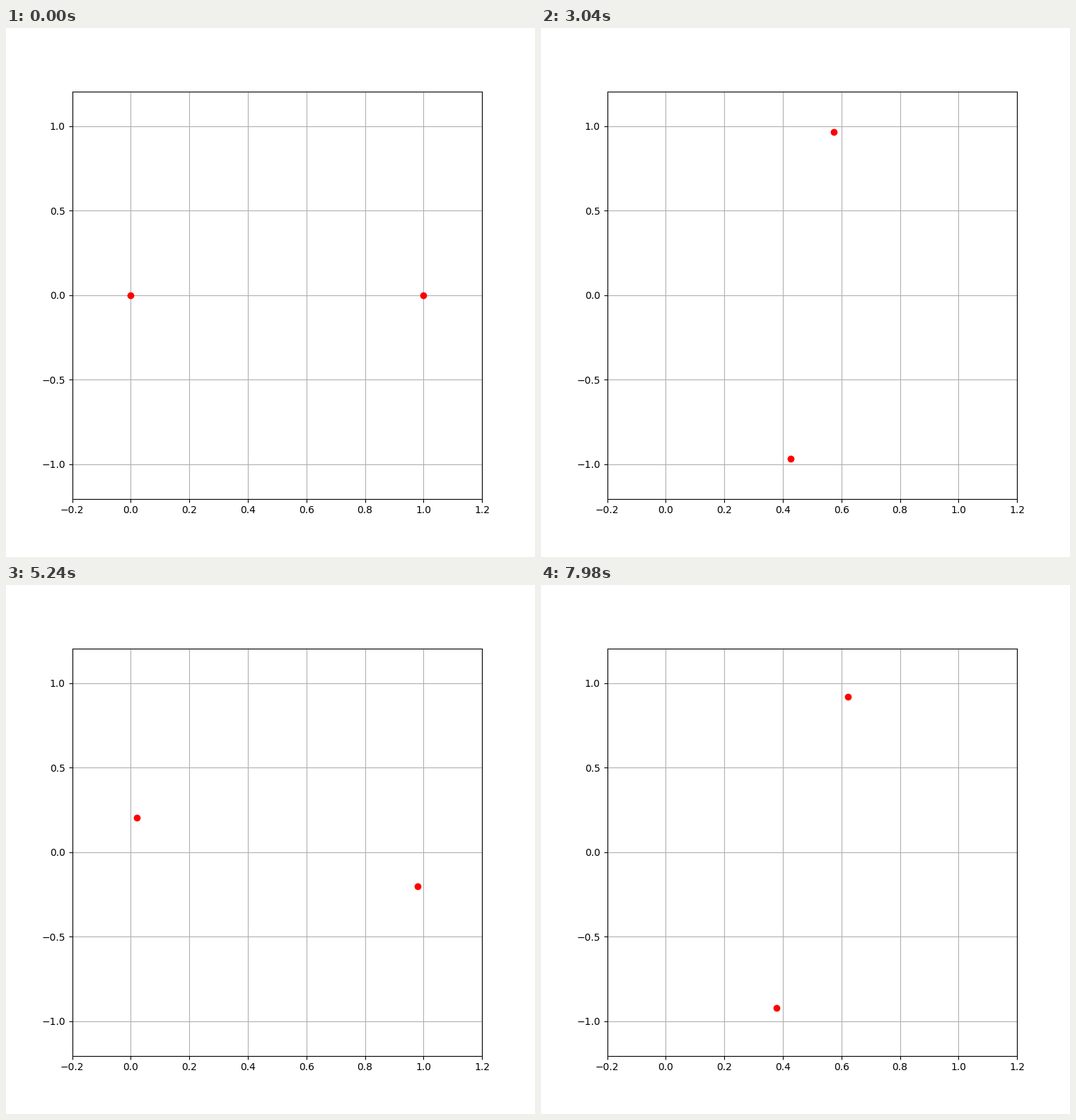
A matplotlib script for the animation above (8 s loop, 748 px wide and 748 px high).

```python
import math

import matplotlib.pyplot as plt
from matplotlib.animation import FuncAnimation

FRAMES = 400
STEP = 0.01          # simulated time per frame
ECC = 0.5            # orbit eccentricity
AXIS = 1 / 3         # semi-major axis of each body's orbit
MOTION = math.sqrt(2 / (2 * AXIS) ** 3)   # mean angular motion


def eccentric_anomaly(mean):
    """Solve Kepler's equation, measured from the far point of the orbit."""
    e = mean
    for _ in range(30):
        e -= (e + ECC * math.sin(e) - mean) / (1 + ECC * math.cos(e))
    return e


def offset(i):
    """Horizontal distance from the centre and sine of the orbital angle."""
    mean = math.remainder(MOTION * STEP * i, 2 * math.pi)
    e = eccentric_anomaly(mean)
    radius = AXIS * (1 + ECC * math.cos(e))
    dx = AXIS * (ECC + math.cos(e))
    sine = AXIS * math.sqrt(1 - ECC ** 2) * math.sin(e) / radius
    return dx, -sine


fig, ax = plt.subplots(figsize=(7.48, 7.48), dpi=100)
ax.set_xlim(-0.2, 1.2)
ax.set_ylim(-1.205, 1.205)
ax.set_xticks([-0.2, 0, 0.2, 0.4, 0.6, 0.8, 1.0, 1.2])
ax.set_yticks([-1, -0.5, 0, 0.5, 1])
ax.grid(True)
dots, = ax.plot([], [], "ro")


def update(i):
    dx, y = offset(i)
    dots.set_data([0.5 - dx, 0.5 + dx], [-y, y])
    return dots,


anim = FuncAnimation(fig, update, frames=FRAMES, interval=20,
                     repeat=True, repeat_delay=0, blit=True)
plt.show()
```
